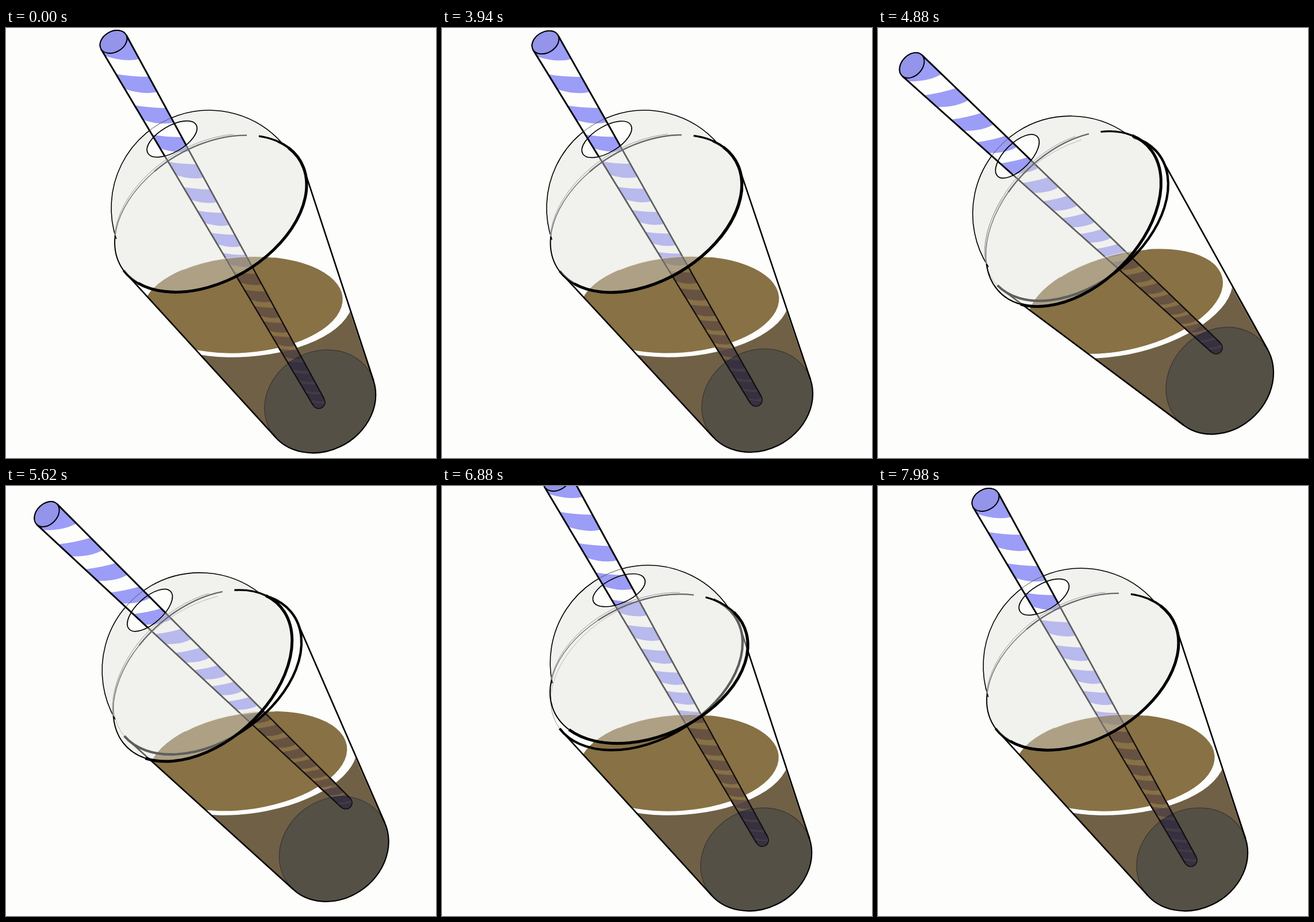
Animation, 748 px wide and 748 px high, one loop 8000 ms. Source, as an HTML page with a canvas:

```html
<!DOCTYPE html>
<html lang="en">
<head>
<meta charset="utf-8">
<title>Iced drink</title>
<style>
html, body { margin: 0; width: 100%; height: 100%; overflow: hidden; background: #fdfdfb; }
canvas { display: block; width: 100%; height: 100%; }
</style>
</head>
<body>
<canvas id="stage" width="748" height="748"></canvas>
<script>
const g = document.getElementById('stage').getContext('2d');
const LOOP = 8000, START = 2780, UNIT = 420;
const RAD = Math.PI / 180;
const BROWN = '#877145';

// time, cup tilt, lid x, y, angle, straw top x, y, straw end x, y
const KEYS = [
  [0,    0,    356, 323, 30.5, 187, 24,  544, 651],
  [740,  0,    356, 323, 30.5, 186, 24,  544, 650],
  [1213, .04,  355, 323, 31,   180, 25,  546, 647],
  [1633, .6,   347, 327, 38,   119, 40,  572, 602],
  [2100, 1,    340, 332, 45,   59,  65,  588, 556],
  [2430, 1.17, 337, 334, 47.5, 35,  88,  590, 548],
  [2893, .5,   342, 330, 42,   71,  49,  591, 551],
  [3500, .03,  352, 323, 32,   140, 8,   576, 588],
  [4153, 0,    360, 318, 24,   200, -11, 557, 616],
  [5226, 0,    356, 323, 30.5, 187, 24,  544, 651]
];

// Nine even steps, then a short pause, in every unit
function clock(t) {
  if (t < START) return 0;
  const p = t - START, n = Math.floor(p / UNIT);
  const step = Math.min(8, Math.floor((p - n * UNIT) / 40));
  return n * UNIT + step * UNIT / 9;
}

function slope(i, k) {
  if (i === 0 || i === KEYS.length - 1) return 0;
  const [a, b, c] = [KEYS[i - 1], KEYS[i], KEYS[i + 1]];
  if ((b[k] - a[k]) * (c[k] - b[k]) <= 0) return 0;
  return (c[k] - a[k]) / (c[0] - a[0]);
}

function poseAt(tau) {
  const last = KEYS.length - 1;
  if (tau >= KEYS[last][0]) return KEYS[last].slice(1);
  let i = 0;
  while (tau >= KEYS[i + 1][0]) i++;
  const a = KEYS[i], b = KEYS[i + 1], d = b[0] - a[0], x = (tau - a[0]) / d;
  const h = x * x * (3 - 2 * x);
  return a.slice(1).map((v, j) => {
    const k = j + 1;
    return v + (b[k] - v) * h + d * x * (1 - x) * ((1 - x) * slope(i, k) - x * slope(i + 1, k));
  });
}

// Ellipse: u runs along the long axis (up right), v towards the cup base
function oval(x, y, a, b, deg) {
  const c = Math.cos(deg * RAD), s = Math.sin(deg * RAD);
  return { x, y, a, b, rot: -deg * RAD, u: [c, -s], v: [s, c] };
}
const offset = (e, p, q) => [e.x + p * e.u[0] + q * e.v[0], e.y + p * e.u[1] + q * e.v[1]];
const trace = (p, e, from = 0, to = 360) => p.ellipse(e.x, e.y, e.a, e.b, e.rot, from * RAD, to * RAD);

function ovalPath(e, from, to) {
  const p = new Path2D();
  trace(p, e, from, to);
  return p;
}

function fill(path, color) {
  g.fillStyle = color;
  g.fill(path);
}
function stroke(path, width, color = '#000') {
  g.lineWidth = width;
  g.strokeStyle = color;
  g.stroke(path);
}
function poly(points, closed) {
  const p = new Path2D();
  points.forEach(([x, y], i) => i ? p.lineTo(x, y) : p.moveTo(x, y));
  if (closed) p.closePath();
  return p;
}
// Everything on the stage except the given shape
function outside(path) {
  const p = new Path2D(path);
  p.rect(-200, -200, 1200, 1200);
  return p;
}

function support(e, n) {
  const p = e.a * (n[0] * e.u[0] + n[1] * e.u[1]);
  const q = e.b * (n[0] * e.v[0] + n[1] * e.v[1]);
  const s = Math.hypot(p, q);
  return { h: e.x * n[0] + e.y * n[1] + s, at: offset(e, e.a * p / s, e.b * q / s) };
}

// Common outer tangent of two ellipses on one side
function tangent(top, base, side) {
  const axis = Math.atan2(base.y - top.y, base.x - top.x);
  let lo = 0, hi = Math.PI, n;
  for (let i = 0; i < 30; i++) {
    const mid = (lo + hi) / 2, f = axis + side * mid;
    n = [Math.cos(f), Math.sin(f)];
    if (support(top, n).h > support(base, n).h) hi = mid; else lo = mid;
  }
  return [support(top, n).at, support(base, n).at];
}

function makeStraw(tx, ty, bx, by) {
  const len = Math.hypot(bx - tx, by - ty);
  const d = [(bx - tx) / len, (by - ty) / len];
  const half = s => 25 - 14 * s;
  // s runs down the straw, side from -1 (left) to 1 (right)
  const at = (s, side, push = 0) => {
    const w = half(s) * side, l = s * len + push * half(s);
    return [tx + d[0] * l + d[1] * w, ty + d[1] * l - d[0] * w];
  };
  const deg = Math.atan2(d[0], d[1]) / RAD;
  const mouth = oval(tx, ty, 25, 18, deg);
  const tip = oval(bx, by, 11, 11, deg);
  const body = poly([at(0, -1), at(0, 1), at(1, 1), at(1, -1)], true);
  trace(body, mouth);
  trace(body, tip);

  const bands = new Path2D();
  for (let n = 0; n < 20; n++) {
    const pos = k => 1.344 - 1.276 * Math.pow(.93, k);
    const w = .27 - .007 * n, s0 = pos(n - w), s1 = pos(n + w);
    bands.moveTo(...at(s0, -1.05, -.72));
    bands.quadraticCurveTo(...at(s0, 0, .45), ...at(s0, 1.05, .72));
    bands.lineTo(...at(s1, 1.05, .72));
    bands.quadraticCurveTo(...at(s1, 0, .15), ...at(s1, -1.05, -.72));
    bands.closePath();
  }
  return { body, bands, mouth: ovalPath(mouth), tip: ovalPath(tip, 0, 180),
    edges: [-1, 1].map(k => poly([at(0, k), at(1, k)])) };
}

function drawStraw(s, wet) {
  g.save();
  g.clip(s.body);
  if (wet) {
    g.fillStyle = '#c2b9f4';
    g.fill(outside(s.bands), 'evenodd');
  } else {
    fill(s.body, '#9b9df7');
    fill(s.bands, '#fdfdfb');
  }
  g.restore();
  const ink = wet ? '#2c2424' : '#000';
  s.edges.forEach(e => stroke(e, wet ? 2.4 : 2.8, ink));
  stroke(s.tip, 1.6, ink);
  if (!wet) {
    fill(s.mouth, '#9394ea');
    stroke(s.mouth, 2);
  }
}

function draw(t) {
  const [c, lx, ly, la, ...ends] = poseAt(clock(t));
  const rim = oval(356 - 11 * c, 323 + 7 * c, 181, 117, 30.5 + 7.5 * c);
  const base = oval(546.5 + 48 * c, 649.5 - 36 * c, 100, 86, 30 + 14 * c);
  const level = oval(412 + 18 * c, 481.5 - 6 * c, 174, 83.5, 4 + 10 * c);
  const edge = oval(level.x + 4, level.y + 3, 187, 87.5, 4 + 10 * c);
  const lid = oval(lx, ly, 181, 117, la);
  const dome = oval(...offset(lid, 2.5, -10), 170, 170, la);
  const hole = oval(...offset(lid, 8, -146), 48.7, 22.6, la);
  const straw = makeStraw(...ends);

  const right = tangent(rim, base, -1), left = tangent(rim, base, 1);
  const hull = poly([right[0], right[1], left[1], left[0]], true);
  trace(hull, rim);
  trace(hull, base);
  const drink = ovalPath(edge, 0, 180);
  drink.lineTo(-200, offset(edge, -187, 0)[1]);
  drink.lineTo(-200, 1000);
  drink.lineTo(1000, 1000);
  drink.lineTo(1000, offset(edge, 187, 0)[1]);
  drink.closePath();

  g.fillStyle = '#fdfdfb';
  g.fillRect(0, 0, 748, 748);
  drawStraw(straw);

  // Drink
  g.save();
  g.clip(straw.body);
  fill(ovalPath(edge), BROWN);
  g.restore();
  g.save();
  g.clip(hull);
  fill(drink, '#706046');
  fill(ovalPath(level), BROWN);
  stroke(ovalPath(level, 235, 290), 1.5, '#f4f2ec');
  fill(ovalPath(base), '#555045');
  stroke(ovalPath(base), 1.3, '#3b3732');
  const wet = new Path2D(drink);
  wet.moveTo(...offset(edge, edge.a, 0));
  trace(wet, edge);
  g.clip(wet);
  g.globalCompositeOperation = 'multiply';
  drawStraw(straw, true);
  g.globalCompositeOperation = 'source-over';
  g.clip(straw.body);
  fill(ovalPath(base), 'rgba(38,34,62,.4)');
  g.restore();

  // Cup
  stroke(poly(right), 2.6);
  stroke(poly(left), 2.6);
  stroke(ovalPath(base, 5, 175), 2.2);
  stroke(ovalPath(rim, -25, 176), 4.2);
  stroke(ovalPath(rim, 176, 300), 1, '#999');

  // Lid
  const shell = ovalPath(dome, 180, 360);
  shell.closePath();
  shell.moveTo(...offset(lid, lid.a, 0));
  trace(shell, lid);
  g.save();
  g.clip(outside(ovalPath(hole)), 'evenodd');
  fill(shell, 'rgba(224,224,220,.42)');
  g.restore();
  stroke(ovalPath(dome, 192, 350), 1.6);
  const back = oval(lid.x, lid.y, 181, 121, la);
  stroke(ovalPath(back, 205, 305), 1, '#9a9a9a');
  stroke(ovalPath(lid, 205, 313), 1.4, '#777');
  stroke(ovalPath(lid, 255, 313), 2.4, '#6a6a6e');
  stroke(ovalPath(lid, -39, -15), 3.2);
  stroke(ovalPath(lid, -15, 160), 5);
  stroke(ovalPath(lid, 160, 206), 2);

  // Straw above the opening
  g.save();
  const open = poly([offset(hole, -900, 0), offset(hole, -900, -900),
    offset(hole, 900, -900), offset(hole, 900, 0)], true);
  trace(open, hole);
  g.clip(open);
  drawStraw(straw);
  g.clip(straw.body);
  stroke(ovalPath(dome, 192, 350), 1, '#555');
  g.restore();
  stroke(ovalPath(hole), 1.7);
}

const begin = performance.now();
function tick() {
  draw((performance.now() - begin) % LOOP);
  requestAnimationFrame(tick);
}
tick();
</script>
</body>
</html>
```
